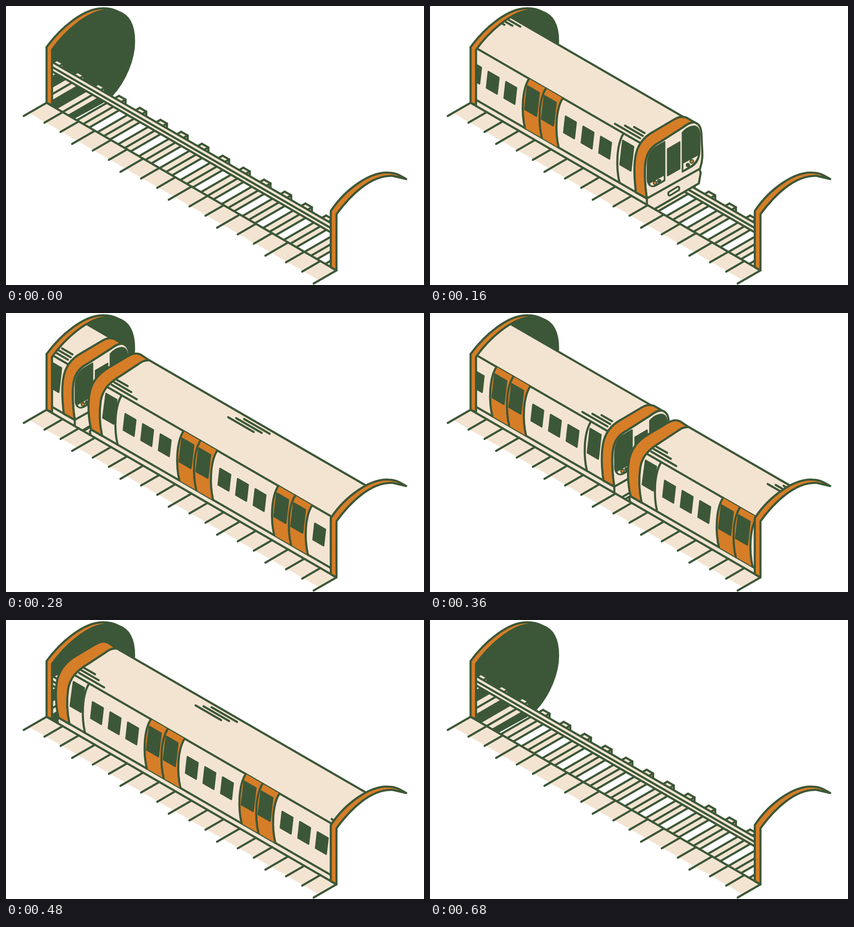
Write an HTML page with a canvas that moves like this. It is 917 px wide and 611 px high and loops after 1920 ms.

```html
<!DOCTYPE html>
<html lang="en">
<head>
<meta charset="utf-8">
<title>Train</title>
<style>
html, body { margin: 0; width: 100%; height: 100%; overflow: hidden; background: #fff; }
canvas { display: block; width: 917px; height: 611px; }
</style>
</head>
<body>
<canvas id="stage" width="917" height="611"></canvas>
<script>
const ctx = document.getElementById('stage').getContext('2d');
const GREEN = '#3c5737', ORANGE = '#d67d28', CREAM = '#f3e4d2';
const LOOP = 1920, TICK = 40, STEP = 126.7, CAR_GAP = 705;
const SLOPE = 0.577, LINE = 4.6;
const SKIRT = -13.4, EAVE = -126.9, RIDGE = -238.5;

// Height of the platform edge at x; "off" moves up or down from it.
const edgeY = (x, off = 0) => 160.65 + SLOPE * x + off;

function shape(d, fill, stroke, width = LINE) {
  const p = new Path2D(d);
  if (fill) { ctx.fillStyle = fill; ctx.fill(p); }
  if (stroke) { ctx.strokeStyle = stroke; ctx.lineWidth = width; ctx.stroke(p); }
}

const poly = pts => 'M' + pts.map(p => p.join(' ')).join('L') + 'Z';

function line(x1, y1, x2, y2) {
  shape(`M${x1} ${y1}L${x2} ${y2}`, null, GREEN);
}

function along(x1, x2, off) {
  line(x1, edgeY(x1, off), x2, edgeY(x2, off));
}

function dot(x, y, r, fill) {
  ctx.beginPath();
  ctx.arc(x, y, r, 0, 7);
  ctx.fillStyle = fill;
  ctx.fill();
  ctx.strokeStyle = GREEN;
  ctx.lineWidth = 2.5;
  ctx.stroke();
}

function shifted(x, y, draw) {
  ctx.save();
  ctx.translate(x, y);
  draw();
  ctx.restore();
}

// ---- Scenery ----

const opening = new Path2D(
  'M103 220V95C130 58 178 14 222 9L260 0H878V379' +
  'C866 372 855 365 840 365C800 362 745 400 712.5 449V571.6Z');

function tunnel() {
  shape('M89 212V90C120 48 170 5 213 5C228 5 238 8 247 13C271 21 281 45 281 78' +
    'C281 116 262 163 232 196L213 212.5L152 246Z', GREEN);
  shape('M89 90C120 48 170 5 213 5C228 5 238 8 247 13C271 21 281 45 281 78' +
    'C281 116 262 163 232 196', null, GREEN);
}

function track() {
  const reach = 120, drop = reach * SLOPE;
  for (let k = -5; k <= 13; k++) {
    const x = 248 + 45.43 * k, y = 196.8 + 26.2 * k;
    const corners = [[x, y], [x + 14.3, y + 8.2], [x + 14.3, y + 23.4]];
    const far = corners.map(([a, b]) => [a - reach, b + drop]);
    shape(poly([...corners, far[2], far[0]]), CREAM);
    corners.forEach((c, i) => line(...c, ...far[i]));
    line(...corners[0], ...corners[1]);
    line(...corners[1], ...corners[2]);
  }
  shape(poly([[90, edgeY(90, -96.5)], [720, edgeY(720, -96.5)],
    [720, edgeY(720, -76)], [90, edgeY(90, -76)]]), CREAM);
  [-96.5, -85.5, -76].forEach(off => along(90, 720, off));
}

function leftPortal() {
  shape('M89 212V90C120 48 170 5 213 5C226 5 236 8 245 12L236 10L222 9' +
    'C178 11 128 58 101 96V217Z', ORANGE, GREEN);
}

function rightPortal() {
  shape('M712.5 572V449C745 400 800 362 840 365C855 365 866 372 878 379' +
    'L848 372C800 370 755 415 725 456V579Z', ORANGE, GREEN);
}

function platform() {
  shape('M89 212L725 579L687 601L52 235Z', CREAM);
  for (let i = 0; i <= 18; i++) {
    const x = 89 + i * 106 / 3, y = edgeY(x), len = i % 3 ? 40 : 50;
    line(x, y, x - len, y + len * SLOPE);
  }
  along(89, 725, 0);
}

// ---- Train ----

function doorEdge(x) {
  const y = edgeY(x, EAVE);
  return [[x, y], [x - 16, y + 25], [x - 17, y + 75], [x - 9, edgeY(x - 9, SKIRT)]];
}

function doorLine(x) {
  const [a, b, c, d] = doorEdge(x);
  shape(`M${a}C${b} ${c} ${d}`, null, GREEN);
}

function pane(x, off, lean, w, h) {
  const y = edgeY(x, off) + 1.5, rise = w * SLOPE;
  x += 0.7;
  shape(poly([[x + lean, y], [x + lean + w, y + rise],
    [x + w, y + h + rise], [x, y + h]]), GREEN, GREEN, 3.4);
}

function doubleDoor(x) {
  const [a, b, c, d] = doorEdge(x), [e, f, g, h] = doorEdge(x + 74);
  shape(`M${a}C${b} ${c} ${d}L${h}C${g} ${f} ${e}Z`, ORANGE);
  [0, 37, 74].forEach(dx => doorLine(x + dx));
  [0, 37].forEach(dx => pane(x - 10 + dx, -106.5, 6, 25.5, 51));
}

function vent(x, y, len) {
  line(x, y, x + len, y + len * SLOPE);
}

function rearEnd() {
  shape('M495 433C488 405 488 375 491 356C495 330 510 311 534 297L576 272' +
    'C590 264 600 265 609 272.5L622 281.5C612 281 606 284 598 290L560 315' +
    'C536 329 520 345 516 370C513 390 512 415 519 447Z', ORANGE, GREEN);
  shape('M495 433L492 438L494 446', null, GREEN);
  vent(551, 324, 24);
  vent(545, 329, 38);
  vent(540, 335, 55);
}

function frontEnd() {
  shape('M222 308V275C217 245 216 205 220 190C224 170 236 159 250 152L300 120' +
    'C312 111 320 107 327 108.5C339 113 341.5 122 342 140C342.5 160 344.5 175 343.5 186' +
    'C342.5 200 339 208 338 212L340 219L336 242Z', CREAM, GREEN);
  shape('M198 262C194 230 194 200 197 183C201 158 214 141 236 129L280 103' +
    'C292 95.5 300 95 309 98L327 108.5C320 107 312 111 300 120L250 152' +
    'C236 159 224 170 220 190C216 205 217 245 222 275Z', ORANGE, GREEN);
  line(222, 275, 338, 210);

  // Windscreens and middle door
  shape('M261 151L244 161C230 169 223 185 223 205V232C223 246 232 252 242 247L261 236Z',
    GREEN, GREEN, 3);
  shape('M229 242L259 225.5V234L240 245C234 248 230 247 229 242Z', CREAM);
  shape('M267.5 167L294 151.5V210L267.5 225Z', GREEN, GREEN, 3);
  shape('M300 131C308 121 322 114 330 118C338 122 338 132 338 145V170' +
    'C338 188 331 200 318 207L300 217Z', GREEN, GREEN, 3);
  shape('M302 198.5L334 181C331 190 326 198 317 203.5L302 212.5Z', CREAM);

  dot(249, 237, 3.5, GREEN);
  dot(240, 241, 3.8, ORANGE);
  dot(312, 202, 3.5, GREEN);
  dot(320.5, 194, 3.8, ORANGE);
  shape('M269 263.5Q269 261.5 271 260.5L289 249.5Q292 248.5 293 251.5V254.5' +
    'Q293 256.5 291 257.5L273 268.5Q270 269.5 269 266.5Z', CREAM, GREEN, 4);

  vent(152, 111.5, 55);
  vent(174, 115.5, 39);
  vent(194, 118.5, 23);
}

function car(dx) {
  shifted(dx, dx * SLOPE, () => {
    shape(poly([[-67.5, edgeY(-67.5)], [-66, 106], [-70, 60], [-62, 10], [-28, -26],
      [15, -51], [47.5, edgeY(47.5, RIDGE)], [683, edgeY(683, RIDGE)],
      [640, 362], [602.5, 470], [602.5, edgeY(602.5)]]), CREAM);
    along(47.5, 683, RIDGE);
    along(-35.5, 588, EAVE);
    along(-66.5, 602.5, SKIRT);

    doorLine(0.5);
    doorLine(551.5);
    [136, 344].forEach(doubleDoor);
    pane(-41.5, -108, 7, 23.5, 53);
    pane(543, -108, 6, 23.5, 53);
    for (let g = 0; g < 3; g++) {
      for (let i = 0; i < 3; i++) pane(3.5 + 208 * g + 38.6 * i, -89.6, 4, 23, 35.5);
    }
    for (let i = 0; i < 3; i++) vent(234 + 17.5 * i, 82 + 2 * i, 56);

    shifted(-561.5, -324, rearEnd);
    shifted(380.5, 219.5, frontEnd);
  });
}

function draw(t) {
  const lead = (Math.floor(t / TICK) - 5) * STEP;
  ctx.fillStyle = '#fff';
  ctx.fillRect(0, 0, 917, 611);
  ctx.lineCap = ctx.lineJoin = 'round';

  tunnel();
  ctx.save();
  ctx.clip(opening);
  track();
  if (t < 680) {
    car(lead - CAR_GAP);
    car(lead);
  }
  ctx.restore();
  leftPortal();
  platform();
  rightPortal();
}

const start = performance.now();
function frame() {
  draw((performance.now() - start) % LOOP);
  requestAnimationFrame(frame);
}
frame();
</script>
</body>
</html>
```
